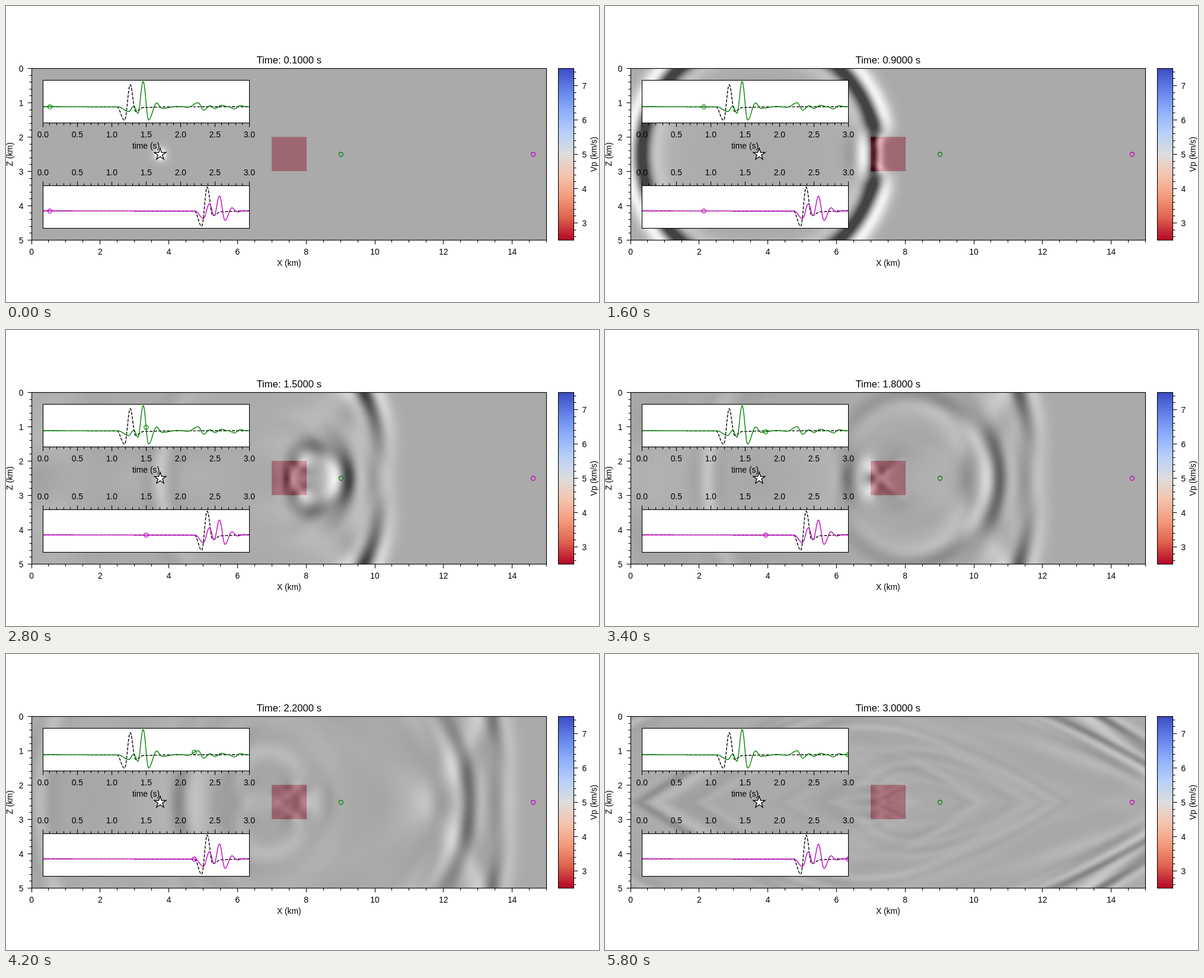
An HTML page with a canvas that plays this animation: 1000x500 px, repeating every 6 s.

```html
<!DOCTYPE html>
<html lang="en">
<head>
<meta charset="utf-8">
<title>Wave propagation past a slow block</title>
<style>
  html, body { margin: 0; width: 100%; height: 100%; overflow: hidden; background: #fff; }
  canvas { display: block; width: 100vw; height: 100vh; }
</style>
</head>
<body>
<canvas id="stage" width="1000" height="500"></canvas>
<script>
const ctx = document.getElementById('stage').getContext('2d');
const FRAMES = 30, FRAME_MS = 200;
const GREEN = '#008000', MAGENTA = '#bf00bf';

// Acoustic wave solver; the model is symmetric, so only one half in depth is computed.
const DX = 0.025, DT = 0.0025, STEPS_PER_FRAME = 40;
const COLS = 601, HALF_ROWS = 101, SPONGE = 60, PAD = SPONGE + 2;
const NX = COLS + 2 * PAD, NZ = 2 + HALF_ROWS + PAD;
const at = (col, row) => (row + 2) * NX + col + PAD;

function ricker(t) {
  const a = (Math.PI * 5 * (t - 0.2)) ** 2;
  return (1 - 2 * a) * Math.exp(-a);
}

function simulate() {
  const size = NX * NZ;
  const courant = new Float32Array(size), damp = new Float32Array(size);
  let now = new Float32Array(size), old = new Float32Array(size);
  for (let row = -2; row < NZ - 2; row++) {
    for (let col = -PAD; col < NX - PAD; col++) {
      const inBlock = col >= 280 && col <= 320 && row <= 20;
      const depth = Math.max(0, -col, col - COLS + 1, row - HALF_ROWS + 1);
      courant[at(col, row)] = ((inBlock ? 2.5 : 5) * DT / DX) ** 2 / 12;
      damp[at(col, row)] = Math.exp(-((0.005 * depth) ** 2));
    }
  }
  const source = at(150, 0), probe = at(250, 0), N2 = 2 * NX;
  const shown = new Float32Array(COLS * HALF_ROWS), snapshots = [];
  let peak = 0;
  for (let step = 1; step <= FRAMES * STEPS_PER_FRAME; step++) {
    for (let z = 2; z < NZ - 2; z++) {
      for (let i = z * NX + 2, end = (z + 1) * NX - 2; i < end; i++) {
        const u = now[i], g = damp[i];
        const lap = 16 * (now[i - 1] + now[i + 1] + now[i - NX] + now[i + NX])
          - (now[i - 2] + now[i + 2] + now[i - N2] + now[i + N2]) - 60 * u;
        old[i] = g * (2 * u - g * old[i] + courant[i] * lap);
      }
    }
    [now, old] = [old, now];
    now[source] += ricker(step * DT);
    now.copyWithin(NX, 3 * NX, 4 * NX);
    now.copyWithin(0, 4 * NX, 5 * NX);
    if (step < 340) peak = Math.max(peak, now[probe]);

    // Late in the run, rows stop being refreshed from the edges inwards.
    const snap = step % STEPS_PER_FRAME === 0;
    for (let row = 0; row < HALF_ROWS; row++) {
      const last = 1200 - 3 * row;
      if (step === last || (snap && step < last)) {
        const start = at(0, row);
        shown.set(now.subarray(start, start + COLS), row * COLS);
      }
    }
    if (snap) snapshots.push(shown.slice());
  }
  return snapshots.map(field => toImage(field, 205 / peak));
}

function toImage(field, gain) {
  const canvas = document.createElement('canvas');
  canvas.width = COLS;
  canvas.height = 2 * HALF_ROWS - 1;
  const c = canvas.getContext('2d'), image = c.createImageData(canvas.width, canvas.height);
  for (let y = 0, p = 0; y < canvas.height; y++) {
    const row = Math.abs(y - HALF_ROWS + 1) * COLS;
    for (let x = 0; x < COLS; x++, p += 4) {
      image.data[p] = image.data[p + 1] = image.data[p + 2] = 148 - gain * field[row + x];
      image.data[p + 3] = 255;
    }
  }
  c.putImageData(image, 0, 0);
  return canvas;
}

// Plot geometry
const LEFT = 43, TOP = 105.5, WIDTH = 868.5, HEIGHT = 290;
const kmX = x => LEFT + x * WIDTH / 15;
const kmZ = z => TOP + z * HEIGHT / 5;
const vpY = v => TOP + HEIGHT * (7.5 - v) / 5;
const timeX = t => 62.3 + 116 * t;
const snapPx = v => Math.floor(v) + 0.5;

function line(x1, y1, x2, y2) {
  ctx.beginPath();
  ctx.moveTo(x1, y1);
  ctx.lineTo(x2, y2);
  ctx.stroke();
}

function text(str, x, y, align = 'center', size = 13.89) {
  ctx.font = `${size}px "Liberation Sans", Arial, sans-serif`;
  ctx.textAlign = align;
  ctx.fillStyle = '#000';
  ctx.fillText(str, x, y);
}

function sideText(str, x, y) {
  ctx.save();
  ctx.translate(x, y);
  ctx.rotate(-Math.PI / 2);
  text(str, 0, 0);
  ctx.restore();
}

function frameBox(x, y, w, h) {
  ctx.strokeStyle = '#000';
  ctx.lineWidth = 1.1;
  ctx.strokeRect(snapPx(x), snapPx(y), Math.round(w), Math.round(h));
}

// Calls draw(value, length) for each tick; every perMajor-th one is long.
function ticks(from, to, minor, perMajor, draw) {
  ctx.strokeStyle = '#000';
  ctx.lineWidth = 1.1;
  for (let n = Math.round(from / minor); n <= Math.round(to / minor); n++) {
    const major = n % perMajor === 0;
    draw(n * minor, major ? 7 : 4, major);
  }
}

function ring(x, y, color) {
  ctx.strokeStyle = color;
  ctx.lineWidth = 1.3;
  ctx.beginPath();
  ctx.arc(x, y, 3.5, 0, 2 * Math.PI);
  ctx.stroke();
}

function star(x, y) {
  ctx.beginPath();
  for (let n = 0; n < 10; n++) {
    const r = n % 2 ? 4 : 10.4, a = n * Math.PI / 5;
    ctx.lineTo(x + r * Math.sin(a), y - r * Math.cos(a));
  }
  ctx.closePath();
  ctx.fillStyle = '#fff';
  ctx.strokeStyle = '#000';
  ctx.lineWidth = 1.3;
  ctx.fill();
  ctx.stroke();
}

// Traces as turning points [x, y], eased in between
const traces = [
  {
    color: GREEN, top: 125, tickY: 197, tickDir: 1, labelY: 222,
    reference: [[62, 170.3], [187, 170.5], [200, 193], [209.5, 133], [218.5, 178], [232, 171.5], [270, 170.4], [411, 170.2]],
    signal: [[62, 170.3], [189, 170.4], [207, 178.3], [215.5, 169], [222.5, 181], [231.3, 127.6], [240.5, 192.5],
      [254, 164], [263, 172.8], [290, 169.8], [307, 171], [324, 163.5], [333.5, 176], [344, 168.5], [352.5, 173.2],
      [363, 167.7], [375, 170.3], [385, 173.8], [395, 168.3], [404, 170], [411, 170.2]]
  },
  {
    color: MAGENTA, top: 303, tickY: 303, tickDir: -1, labelY: 286,
    reference: [[62, 346.3], [318, 346.5], [330, 372], [339.3, 306], [348.5, 354], [363, 347.5], [400, 346], [411, 345.8]],
    signal: [[62, 346.3], [319, 346.5], [333, 359], [343, 334], [351, 354], [360, 321], [369.3, 362],
      [381, 341], [390, 348], [400, 346.2], [411, 346.3]]
  }
];

function valueAt(points, x) {
  const i = Math.max(1, points.findIndex(p => p[0] >= x));
  const [x1, y1] = points[i - 1], [x2, y2] = points[i];
  return y1 + (y2 - y1) * (1 - Math.cos(Math.PI * (x - x1) / (x2 - x1))) / 2;
}

function curve(points, color, dash) {
  ctx.strokeStyle = color;
  ctx.lineWidth = 1.39;
  ctx.setLineDash(dash);
  ctx.beginPath();
  for (let x = 62.3; x <= 410.5; x += 0.5) ctx.lineTo(x, valueAt(points, x));
  ctx.stroke();
  ctx.setLineDash([]);
}

function drawInset(trace, time) {
  const { color, top, tickY, tickDir, labelY, reference, signal } = trace;
  ctx.fillStyle = '#fff';
  ctx.fillRect(62.5, top + 0.5, 348, 72);
  ctx.save();
  ctx.beginPath();
  ctx.rect(62.5, top + 0.5, 348, 72);
  ctx.clip();
  curve(reference, '#000', [5.1, 2.2]);
  curve(signal, color, []);
  ring(timeX(time), valueAt(signal, timeX(time)), color);
  ctx.restore();
  frameBox(62, top, 348, 72);
  ticks(0, 3, 0.1, 5, (t, length, major) => {
    const x = snapPx(timeX(t)), y = tickY + 0.5;
    line(x, y, x, y + tickDir * length);
    if (major) text(t.toFixed(1), timeX(t), labelY);
  });
}

function drawField(image) {
  ctx.save();
  ctx.beginPath();
  ctx.rect(LEFT, TOP, WIDTH, HEIGHT);
  ctx.clip();
  const cell = WIDTH / 600, cellZ = HEIGHT / 200;
  ctx.drawImage(image, LEFT - cell / 2, TOP - cellZ / 2, COLS * cell, 201 * cellZ);
  ctx.restore();

  const block = [448, 221, 59, 58];
  ctx.beginPath();
  ctx.rect(LEFT, TOP, WIDTH, HEIGHT);
  ctx.rect(...block);
  ctx.fillStyle = 'rgba(221,221,221,0.3)';
  ctx.fill('evenodd');
  ctx.fillStyle = 'rgba(180,4,38,0.3)';
  ctx.fillRect(...block);
}

function drawAxes() {
  frameBox(LEFT, TOP, WIDTH - 0.5, HEIGHT);
  ticks(0, 15, 0.5, 4, (x, length, major) => {
    line(snapPx(kmX(x)), 395.5, snapPx(kmX(x)), 395.5 + length);
    if (major) text(x, kmX(x), 420);
  });
  ticks(0, 5, 0.2, 5, (z, length, major) => {
    line(43.5, snapPx(kmZ(z)), 43.5 - length, snapPx(kmZ(z)));
    if (major) text(Math.round(z), 29.5, kmZ(z) + 5, 'right');
  });
  text('X (km)', 477.3, 439);
  sideText('Z (km)', 11, 250.5);
}

const coolwarm = ['59,76,192', '98,130,234', '141,176,254', '184,208,249', '221,221,221',
  '245,196,173', '244,154,123', '222,96,77', '180,4,38'];

function drawColorbar() {
  const gradient = ctx.createLinearGradient(0, TOP, 0, TOP + HEIGHT);
  coolwarm.forEach((rgb, i) => gradient.addColorStop(i / 8, `rgb(${rgb})`));
  ctx.fillStyle = gradient;
  ctx.fillRect(931.5, TOP, 26, HEIGHT);
  frameBox(931, TOP, 26, HEIGHT);
  ticks(2.6, 7.4, 0.2, 5, (v, length, major) => {
    line(957.5, snapPx(vpY(v)), 957.5 + length, snapPx(vpY(v)));
    if (major) text(Math.round(v), 971.5, vpY(v) + 5, 'left');
  });
  sideText('Vp (km/s)', 996, 250.5);
}

function draw(index) {
  const time = (index + 1) / 10;
  ctx.fillStyle = '#fff';
  ctx.fillRect(0, 0, 1000, 500);
  drawField(fields[index]);
  drawAxes();
  drawColorbar();
  text(`Time: ${time.toFixed(4)} s`, 477.3, 97, 'center', 16.67);
  ring(565, 250.5, GREEN);
  ring(889, 250.5, MAGENTA);
  star(260, 250.5);
  text('time (s)', 236, 241);
  traces.forEach(trace => drawInset(trace, time));
}

const fields = simulate();
const start = performance.now();
let current = 0;
draw(current);

function tick() {
  const index = Math.floor((performance.now() - start) / FRAME_MS) % FRAMES;
  if (index !== current) draw(current = index);
  requestAnimationFrame(tick);
}
requestAnimationFrame(tick);
</script>
</body>
</html>
```
